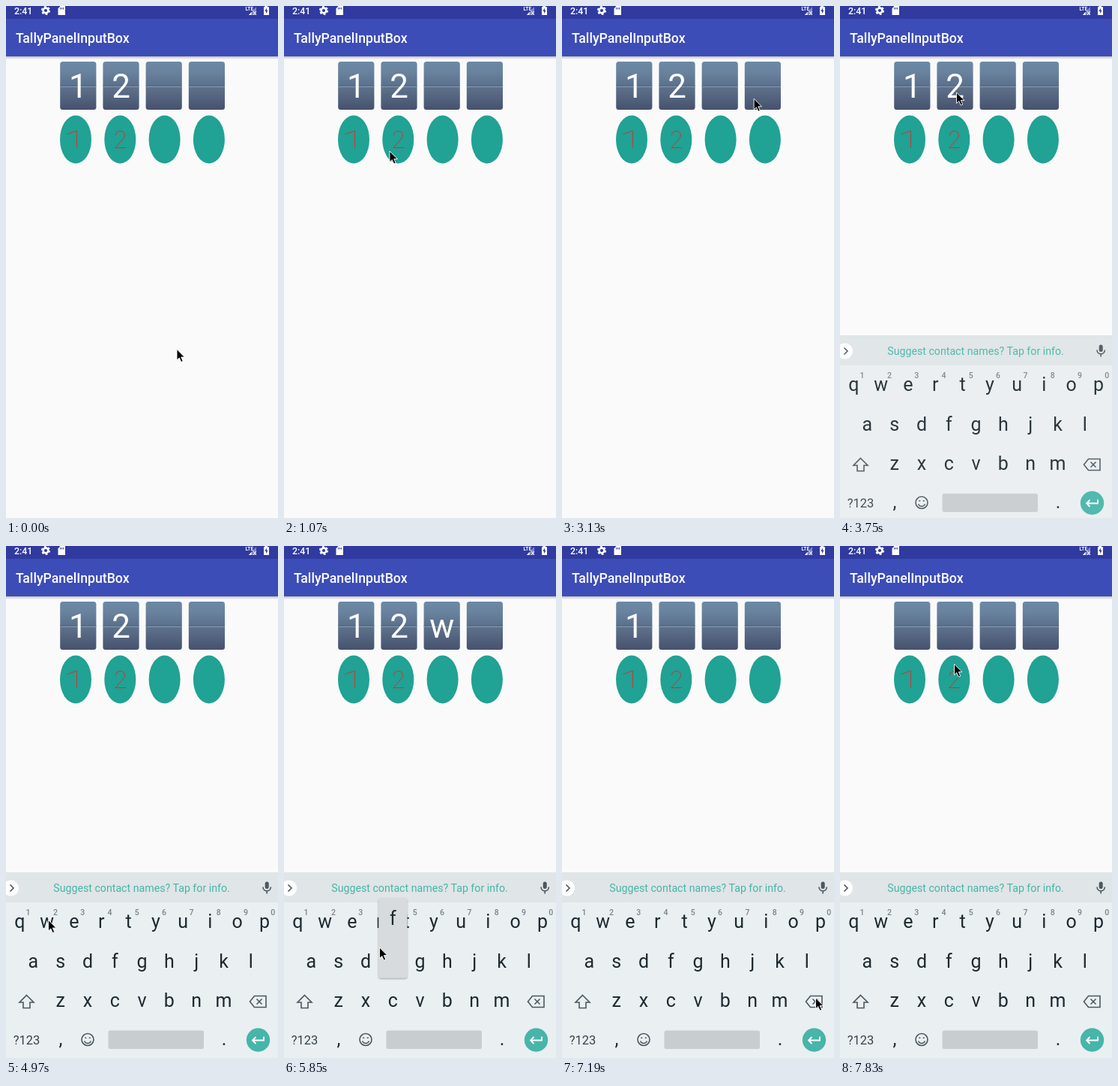
An HTML page for the animation above (8 s loop, 363 px wide and 681 px high).

```html
<!DOCTYPE html>
<html lang="en">
<head>
<meta charset="utf-8">
<title>Tile input</title>
<style>
html, body { margin: 0; width: 100%; height: 100%; overflow: hidden; background: #fafafa; }
svg { display: block; width: 363px; height: 681px; font-family: Roboto, sans-serif; }
.mid { text-anchor: middle; }
.tile { font-size: 44px; fill: #fff; }
.key { font-size: 25px; fill: #1d2a30; }
.hint { font-size: 10.5px; font-weight: 500; fill: #78838a; }
.line { fill: none; stroke: #4b585f; stroke-width: 1.6; }
.red { fill: none; stroke: #e02a2a; stroke-width: 1; }
</style>
</head>
<body>
<svg viewBox="0 0 363 681">
  <defs>
    <linearGradient id="face" x2="0" y2="1">
      <stop offset="0" stop-color="#6b89a5"/>
      <stop offset=".2" stop-color="#6a839f"/>
      <stop offset=".5" stop-color="#5a718c"/>
      <stop offset=".52" stop-color="#5f728c"/>
      <stop offset="1" stop-color="#46526e"/>
    </linearGradient>
    <linearGradient id="shade" x2="0" y2="1">
      <stop offset="0" stop-opacity=".24"/>
      <stop offset="1" stop-opacity="0"/>
    </linearGradient>
    <filter id="drop" x="-20%" y="-20%" width="140%" height="140%">
      <feDropShadow dx="0" dy="1" stdDeviation="1.2" flood-opacity=".4"/>
    </filter>
  </defs>

  <rect width="363" height="681" fill="#fafafa"/>
  <rect y="67" width="363" height="4" fill="url(#shade)"/>
  <rect y="17" width="363" height="50" fill="#3d4db7"/>
  <rect width="363" height="17" fill="#303a9f"/>
  <text x="13" y="49" font-size="17.7" font-weight="500" fill="#fff">TallyPanelInputBox</text>

  <g fill="#fff">
    <text x="11" y="11" font-size="12.4" font-weight="500">2:41</text>
    <circle cx="53" cy="6" r="3.4" fill="none" stroke="#fff" stroke-width="2.6"/>
    <circle cx="53" cy="6" r="5.2" fill="none" stroke="#fff" stroke-width="1.8" stroke-dasharray="2.72"/>
    <path d="M72.5 0H79V12H69.5V3.5Z"/>
    <path d="M72.5 2v2.5M74.5 2v2.5M76.5 2v2.5" stroke="#303a9f"/>
    <text x="319.5" y="6" font-size="6.5" font-weight="700">LTE</text>
    <path d="M334 1V12H324Z" opacity=".4"/>
    <path d="M327.5 8V12H324Z"/>
    <path d="M330 7l4 5M334 7l-4 5" stroke="#fff"/>
    <path d="M345.5 0h3.5v1.2h2V12h-7V1.2h1.5Z"/>
    <path d="M348 2.6l-2.6 4.4h1.6v3.2l2.6-4.4H348Z" fill="#303a9f"/>
  </g>

  <g id="tiles"></g>
  <g id="icons" fill="#20a294"></g>
  <path class="red" d="M81.500 170.500L94.500 166V188.500" stroke-opacity=".9"/>
  <path class="red" d="M146.500 172C146.500 164.500 158.500 164.500 158.500 172C158.500 176 152 181 146 188.500H160"/>

  <g id="board">
    <rect y="434" width="363" height="275" fill="#eaeff2"/>
    <rect y="434" width="363" height="40" fill="#e0e5e7"/>
    <circle cx="6.500" cy="455" r="10.500" fill="#fff"/>
    <path d="M5.500 450.500l4.500 4.500-4.500 4.500" class="line" stroke-width="2"/>
    <text class="mid" x="181" y="460" font-size="14.2" fill="#45b5a8">Suggest contact names? Tap for info.</text>
    <rect x="345.700" y="446.500" width="5" height="9.500" rx="2.500" fill="#4b585f"/>
    <path class="line" d="M343 453.500c0 7 10.400 7 10.400 0M348.200 459v3.500"/>
    <rect id="press" x="311" y="584" width="50" height="42" rx="3" fill="#d5dadd"/>
    <g id="keys"></g>
    <path class="line" d="M27.500 597.500L37 607h-5v7.500h-9V607h-5Z"/>
    <path class="line" d="M331.500 598.500H347V613.500H331.500L325.500 606ZM334.500 602.500l7 7M341.500 602.500l-7 7"/>
    <text class="mid" x="27.500" y="662.500" font-size="16.500" fill="#36434a">?123</text>
    <text class="mid key" x="73" y="664">,</text>
    <circle class="line" cx="109" cy="656.500" r="8"/>
    <path class="line" d="M104.500 658.500c2 4 7 4 9 0"/>
    <path class="line" d="M105.300 654.200h2M110.700 654.200h2" stroke-width="2"/>
    <rect x="136.500" y="644.500" width="127.500" height="24.500" rx="2.500" fill="#c8cdd0"/>
    <text class="mid key" x="291" y="664">.</text>
    <circle cx="336.500" cy="657" r="15.700" fill="#47b5a9"/>
    <path d="M344 652.500v5H329.500M333.500 653l-4.500 4.500 4.500 4.500" fill="none" stroke="#fff" stroke-width="1.800"/>
    <g id="popup">
      <rect x="-19" width="38" height="106" rx="3" fill="#d7dbdd" filter="url(#drop)"/>
      <text class="mid key" y="35"></text>
    </g>
  </g>

  <path id="cursor" d="M0 0V14.500L3.300 11.500L5.700 17L8.200 16L5.800 10.500H10.400Z" fill="#000" stroke="#fff" stroke-width=".9"/>
</svg>
<script>
const LOOP = 8000;
const $ = id => document.getElementById(id);

const tileX = i => 72.2 + i * 57.2;
for (let i = 0; i < 4; i++) {
  const x = tileX(i);
  $('tiles').innerHTML += `
    <rect x="${x}" y="74" width="48.200" height="64" rx="3.500" fill="url(#face)"/>
    <path d="M${x} 106.300h48.200" stroke="#3f4d66" opacity=".6"/>
    <path d="M${x} 107.300h48.200" stroke="#8fa6bd"/>
    <text class="mid tile" x="${x + 24.1}" y="122"></text>`;
  $('icons').innerHTML += `<ellipse cx="${93 + i * 59.3}" cy="177.500" rx="21" ry="32"/>`;
}
const labels = [...document.querySelectorAll('.tile')];

const PITCH = 36.3;
[['qwertyuiop', 18.3, 508], ['asdfghjkl', 36.4, 560.5], ['zxcvbnm', 72.6, 613]].forEach(([row, x0, y], r) => {
  [...row].forEach((c, i) => {
    const x = x0 + i * PITCH;
    $('keys').innerHTML += `<text class="mid key" x="${x}" y="${y}">${c}</text>` +
      (r ? '' : `<text class="mid hint" x="${x + 11.3}" y="490.500">${(i + 1) % 10}</text>`);
  });
});

// Pointer moves: start, end, steps, points passed through
const moves = [
  [830, 1070, 5, [[228, 456.5], [141, 193]]],
  [1370, 1840, 9, [[141, 193], [217.5, 107.5]]],
  [2500, 2900, 8, [[217.5, 107.5], [246, 117]]],
  [3080, 3190, 3, [[246, 117], [259, 125], [170, 150], [81, 175]]],
  [3490, 3750, 5, [[81, 175], [155.5, 115]]],
  [4150, 4740, 11, [[155.5, 116], [169, 200], [140, 350], [80, 490], [44, 557], [56.5, 497.5]]],
  [5200, 5620, 8, [[56.5, 497.5], [127.5, 534]]],
  [6020, 6430, 8, [[127.5, 534], [240, 600], [334, 655], [338.5, 601]]],
  [7430, 7830, 8, [[338.5, 601], [152.5, 157]]]
];

// Tile letters: tile, letter, from, to
const letters = [
  [0, '1', 0, 7370], [1, '2', 0, 7140],
  [2, 'w', 5090, 6900], [3, 'f', 5970, 6610]
];

// Key popups: letter, x, y, from, to
const popups = [['w', 54.6, 416, 4920, 4970], ['f', 145.3, 468.5, 5850, 5910]];
const presses = [[6850, 6900], [7080, 7140], [7310, 7370]];

const within = (t, a, b) => t >= a && t < b;
const show = (el, on) => el.setAttribute('visibility', on ? 'visible' : 'hidden');

function stepped(t, start, end, n) {
  if (t < start) return 0;
  return Math.min(1, (Math.floor((t - start) * (n - 1) / (end - start) + 1e-6) + 1) / n);
}

function pointerAt(t) {
  let cur = moves[0];
  for (const m of moves) if (t >= m[0]) cur = m;
  const [start, end, n, pts] = cur;
  const p = stepped(t, start, end, n);
  const s = p * p * (3 - 2 * p) * (pts.length - 1);
  const i = Math.min(Math.floor(s), pts.length - 2);
  return [0, 1].map(k => pts[i][k] + (pts[i + 1][k] - pts[i][k]) * (s - i));
}

function draw(t) {
  $('cursor').setAttribute('transform', `translate(${pointerAt(t)})`);

  labels.forEach((el, i) => {
    const hit = letters.find(l => l[0] === i && within(t, l[2], l[3]));
    el.textContent = hit ? hit[1] : '';
  });

  const rise = stepped(t, 3490, 3800, 6);
  $('board').setAttribute('transform', `translate(0 ${24 * (1 - rise)})`);
  $('board').setAttribute('opacity', Math.min(1, rise * 1.12));

  const pop = popups.find(p => within(t, p[3], p[4]));
  show($('popup'), pop);
  if (pop) {
    $('popup').setAttribute('transform', `translate(${pop[1]} ${pop[2]})`);
    $('popup').lastElementChild.textContent = pop[0];
  }
  show($('press'), presses.some(p => within(t, ...p)));
}

const begin = performance.now();
function tick() {
  draw((performance.now() - begin) % LOOP);
  requestAnimationFrame(tick);
}
tick();
</script>
</body>
</html>
```
